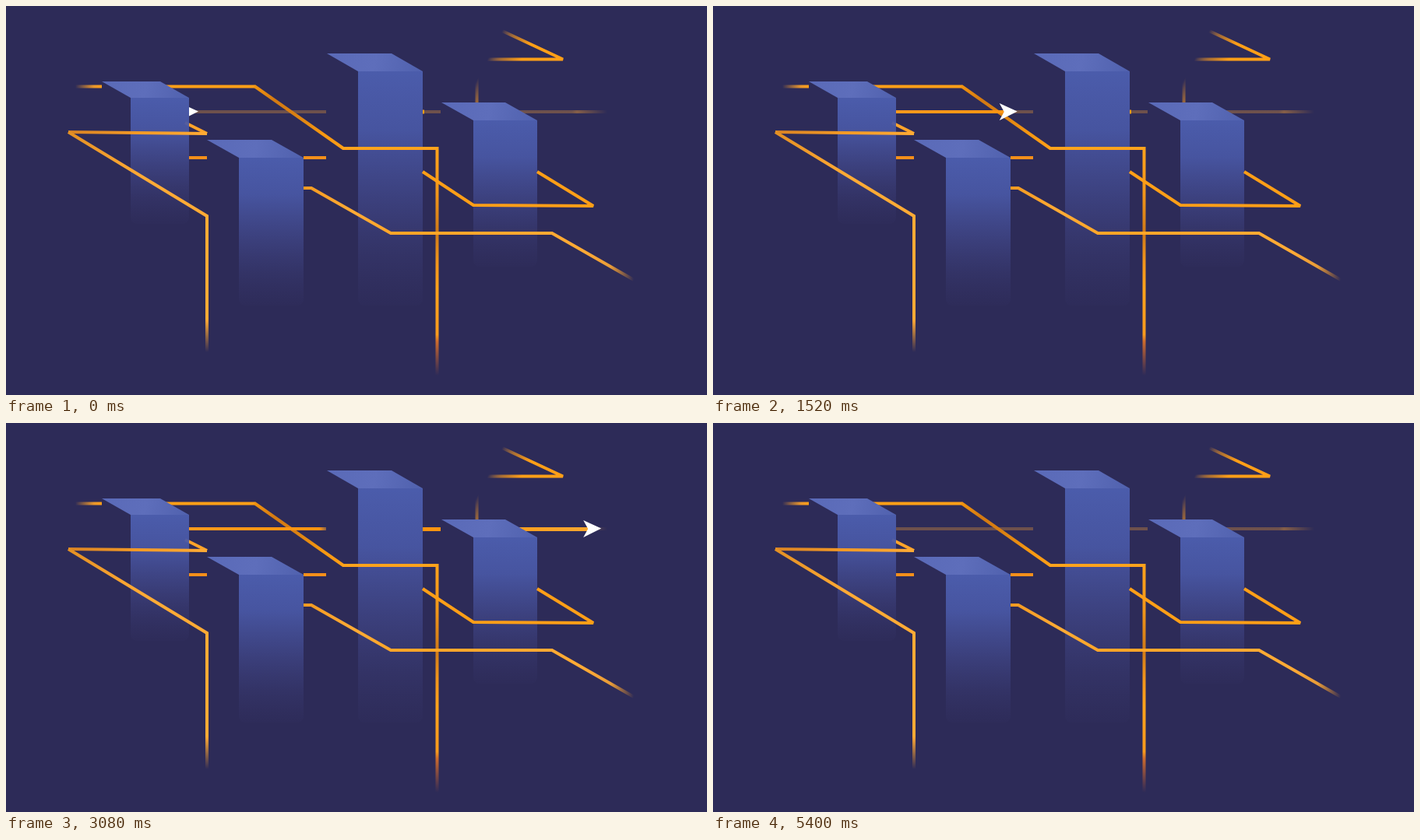
Write an HTML page with a canvas that moves like this. It is 900 px wide and 500 px high and loops after 6880 ms.

```html
<!DOCTYPE html>
<html lang="en">
<head>
<meta charset="utf-8">
<title>Flow lines</title>
<style>
html, body { margin: 0; width: 100%; height: 100%; overflow: hidden; background: #2d2b58; }
canvas { display: block; }
</style>
</head>
<body>
<canvas id="stage" width="900" height="500"></canvas>
<script>
const ctx = document.getElementById('stage').getContext('2d');
const LOOP = 6880, STEP = 40, BG = '#2d2b58';
const ORANGE = '#ff9f17', LIGHT = '#ffab35', DARK = '#d47a12', CLEAR = 'rgba(255,160,40,0)';

const clamp = v => Math.max(0, Math.min(1, v));
const ease = p => (1 - Math.cos(Math.PI * p)) / 2;

function grad(x0, y0, x1, y1, ...stops) {
  const g = ctx.createLinearGradient(x0, y0, x1, y1);
  stops.forEach(([at, color]) => g.addColorStop(at, color));
  return g;
}

function trace(points) {
  ctx.beginPath();
  points.forEach(([x, y]) => ctx.lineTo(x, y));
}

function line(points, color, width = 4) {
  trace(points);
  ctx.strokeStyle = color;
  ctx.lineWidth = width;
  ctx.lineJoin = 'miter';
  ctx.miterLimit = 2;
  ctx.stroke();
}

function fill(points, color) {
  trace(points);
  ctx.closePath();
  ctx.fillStyle = color;
  ctx.fill();
}

// x, y: left corner of the lid; w: width; dx, dy: lid offset; end: foot
function tower(x, y, w, dx, dy, end) {
  const left = x + dx, top = y + dy;
  const face = grad(0, top, 0, end,
    [0, 'rgba(75,92,171,1)'], [0.25, 'rgba(73,88,166,.92)'],
    [0.5, 'rgba(72,83,158,.6)'], [0.78, 'rgba(70,76,145,.25)'], [1, 'rgba(68,68,130,.04)']);
  ctx.beginPath();
  ctx.roundRect(left, top, w, end - top, [0, 0, 8, 8]);
  ctx.fillStyle = face;
  ctx.fill();
  fill([[x, y], [x + w, y], [left + w, top], [left, top]],
    grad(x, y, left + w, top, [0, '#5a6ab8'], [0.5, '#5e6ebb'], [1, '#5061ae']));
}

// Three stretches of the track, each seen through its own window
const runs = [
  { from: 235, to: 411, y: 136, w: 4, start: 500, end: 1920, tip0: 247, tip1: 423, move: ease,
    color: () => grad(235, 0, 413, 0, [0, '#ff9a1c'], [0.94, '#ff9410'], [1, CLEAR]) },
  { from: 535, to: 558, y: 136.5, w: 5, start: 2040, end: 2280, tip0: 535, tip1: 582, move: p => p,
    color: () => '#ff9410' },
  { from: 640, to: 830, y: 136.5, w: 5, start: 2560, end: 3520, tip0: 686.5, tip1: 824, move: ease,
    color: () => grad(664, 0, 804, 0, [0, '#ffa01e'], [0.5, '#f8a62e'], [0.84, '#ffa01c'], [1, CLEAR]) }
];

function arrow(tip) {
  fill([[tip, 135.5], [tip - 23, 125], [tip - 17, 136], [tip - 23, 147]], '#fff');
}

function drawRun(run, t) {
  const { from, to, y, w, start, end } = run;
  const tip = run.tip0 + (run.tip1 - run.tip0) * run.move(clamp((t - start) / (end - start)));
  const done = t >= end;
  const waiting = run === runs[0];
  ctx.save();
  ctx.beginPath();
  ctx.rect(from, 100, to - from, 70);
  ctx.clip();
  if (t > start) {
    ctx.globalAlpha = clamp((5400 - t) / 520);
    line([[from, y], [done ? to : tip - 17, y]], run.color(), w);
    ctx.globalAlpha = 1;
  }
  if (!done && (waiting || t > start)) arrow(tip);
  ctx.restore();
}

function drawBack() {
  const dim = 'rgba(255,166,50,.31)';
  line([[235, 136], [411, 136]], dim);
  line([[535, 136], [558, 136]], dim);
  line([[640, 136], [772, 136]],
    grad(664, 0, 772, 0, [0, dim], [0.58, dim], [0.64, 'rgba(255,166,50,.42)'], [1, CLEAR]));

  line([[89, 103.5], [123, 103.5]], grad(89, 0, 123, 0, [0, CLEAR], [0.7, '#e8962c'], [1, ORANGE]));
  line([[230, 150], [258, 164]], '#ffa42a');
  line([[235, 195], [258, 195]], '#f58f1a');
  line([[382, 195], [411, 195]], '#f58f1a');
  line([[637, 32], [715, 68.5], [604.5, 68.5], [604.5, 130]],
    grad(637, 32, 672, 50, [0, CLEAR], [0.5, '#b5752f'], [1, ORANGE]));
}

function drawFront() {
  line([[200, 103.5], [320, 103.5]], ORANGE);
  line([[319, 103], [433, 183]],
    grad(320, 103, 433, 183, [0, '#f0930f'], [0.22, DARK], [0.45, '#d98012'], [0.75, '#f59711'], [1, ORANGE]));
  line([[432, 183], [553.5, 183], [553.5, 475]],
    grad(0, 183, 0, 475, [0, '#ffa31c'], [0.2, '#f0961a'], [0.37, '#cf7a18'],
      [0.5, '#f0951c'], [0.62, '#ffa31c'], [0.82, '#f79a1d'], [0.85, '#cc6b2c'], [1, 'rgba(190,90,50,0)']));
}

function drawOver() {
  line([[258, 164], [80, 162]], grad(80, 0, 258, 0, [0, '#d98324'], [0.5, '#f39a26'], [1, LIGHT]));
  line([[80, 162], [258, 270], [258, 445]],
    grad(0, 162, 0, 445, [0, '#e39024'], [0.2, LIGHT], [0.85, LIGHT], [1, CLEAR]));
  line([[382, 234], [392, 234], [494, 292], [701, 292], [806, 352]],
    grad(382, 0, 806, 0, [0, '#f29a20'], [0.15, LIGHT], [0.3, '#ffa526'], [0.85, LIGHT], [0.93, '#e89c38'], [1, CLEAR]));
  line([[535, 213], [600, 256], [754, 257], [682, 213]], ORANGE);
}

function draw(t) {
  ctx.fillStyle = BG;
  ctx.fillRect(0, 0, 900, 500);
  drawBack();
  if (t <= 2040) line([[535, 136], [537, 136]], ORANGE, 5);
  drawFrontBehindFirst();
  runs.forEach(run => drawRun(run, t));
  tower(123, 97, 75, 37, 21, 280);
  tower(258, 172, 83, 41, 23, 385);
  tower(559, 124, 82, 41, 23, 335);
  drawOver();
}

// The third tower stands behind the long upper line, the others before it
function drawFrontBehindFirst() {
  tower(412, 61, 83, 40, 23, 385);
  drawFront();
}

function tick(now) {
  const t = now % LOOP;
  draw(Math.floor(t / STEP) * STEP);
  requestAnimationFrame(tick);
}
draw(0);
requestAnimationFrame(tick);
</script>
</body>
</html>
```
